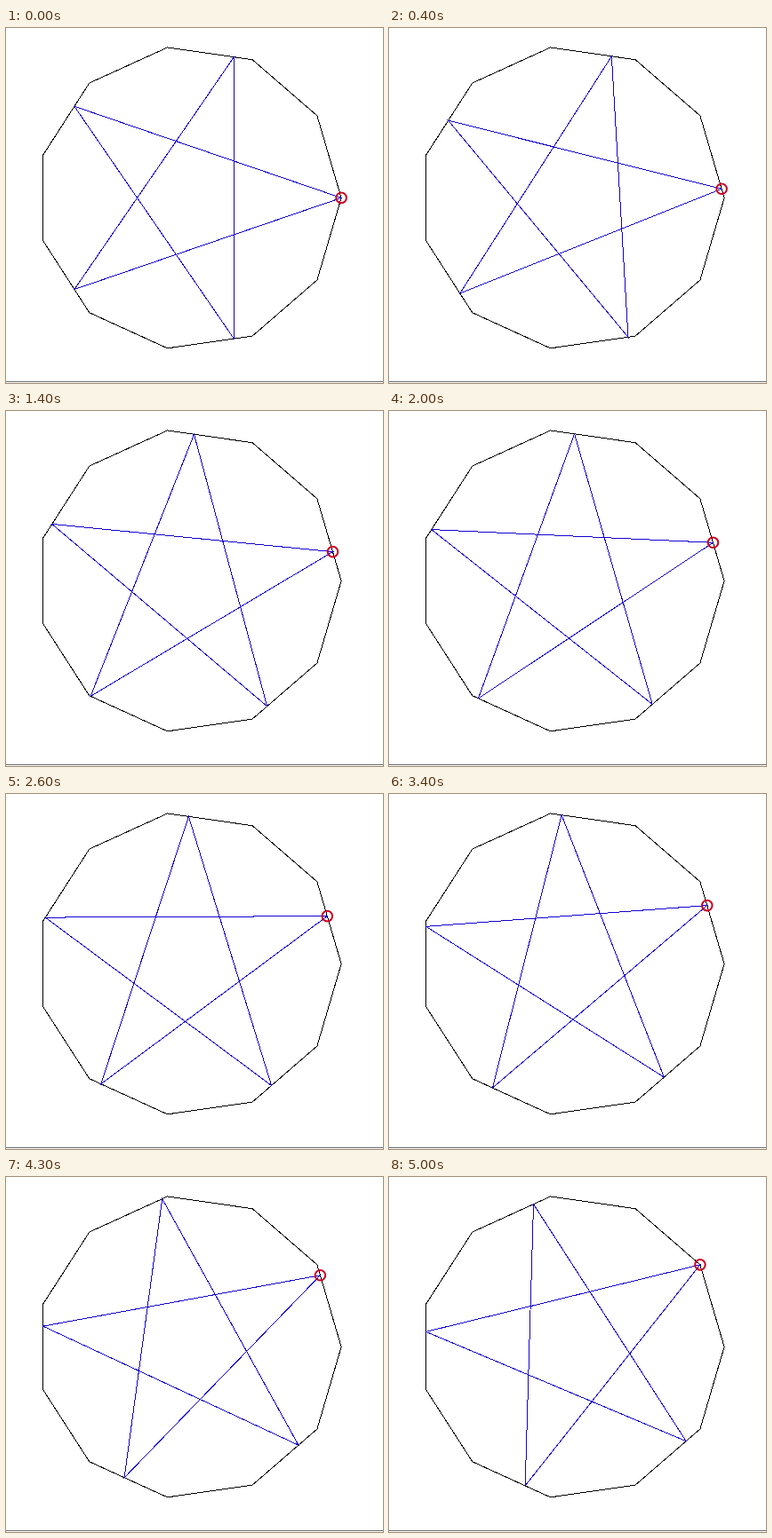
An HTML page that plays this animation: 424x400 px, repeating every 5.1 s.

```html
<!DOCTYPE html>
<html lang="en">
<head>
<meta charset="utf-8">
<title>Equilateral pentagram in a hendecagon</title>
<style>
  html, body { margin: 0; width: 100%; height: 100%; overflow: hidden; background: #fff; }
  svg { display: block; width: 424px; height: 400px; }
  .line { fill: none; stroke-width: 1; shape-rendering: crispEdges; }
</style>
</head>
<body>
<svg viewBox="0 0 424 400">
  <rect width="424" height="400" fill="#fff"/>
  <rect y="398" width="424" height="1" fill="#6c6c6c"/>
  <polygon id="ring" class="line" stroke="#000"/>
  <polygon id="star" class="line" stroke="#1400d2"/>
  <circle id="mark" r="5.8" fill="none" stroke="#cc0022" stroke-width="2"/>
</svg>
<script>
const SIDES = 11, CX = 205.9, CY = 191.4, R = 171.2;
const LOOP = 5100, STEP = 100;
const ring = document.getElementById('ring');
const star = document.getElementById('star');
const mark = document.getElementById('mark');

// Position of the leading tip along one side: [step, fraction]
const pace = [[0, 0], [4, .109], [6, .168], [14, .354], [18, .427],
              [26, .581], [34, .711], [43, .871], [50, 1]];

function corner(k) {
  const a = 2 * Math.PI * k / SIDES;
  return [CX + R * Math.cos(a), CY - R * Math.sin(a)];
}

// Point on the outline, u counted in sides
function at(u) {
  const k = Math.floor(u), f = u - k;
  const a = corner(k), b = corner(k + 1);
  return [a[0] + (b[0] - a[0]) * f, a[1] + (b[1] - a[1]) * f];
}

function bisect(lo, hi, tooLow) {
  for (let i = 0; i < 40; i++) {
    const mid = (lo + hi) / 2;
    if (tooLow(mid)) lo = mid; else hi = mid;
  }
  return (lo + hi) / 2;
}

// Next outline position at chord length len from u
function hop(u, len) {
  const p = at(u);
  return bisect(u + 3.5, u + 5.2, v => {
    const q = at(v);
    return Math.hypot(q[0] - p[0], q[1] - p[1]) < len;
  });
}

function walk(u, len) {
  const path = [u];
  for (let i = 0; i < 5; i++) path.push(hop(path[i], len));
  return path;
}

// Five equal chords that close after two turns
function pentagram(u) {
  const len = bisect(300, 330, l => walk(u, l)[5] < u + 2 * SIDES);
  return walk(u, len).slice(0, 5).map(at);
}

function progress(n) {
  let i = 1;
  while (i < pace.length - 1 && pace[i][0] < n) i++;
  const [n0, s0] = pace[i - 1], [n1, s1] = pace[i];
  return s0 + (s1 - s0) * (n - n0) / (n1 - n0);
}

const toPoints = list => list.map(p => p.map(c => c.toFixed(2)).join()).join(' ');

let shown = -1;
function draw(ms) {
  const n = Math.floor((ms % LOOP) / STEP);
  if (n === shown) return;
  shown = n;
  const tips = pentagram(progress(n));
  star.setAttribute('points', toPoints(tips));
  mark.setAttribute('cx', tips[0][0]);
  mark.setAttribute('cy', tips[0][1]);
}

ring.setAttribute('points', toPoints(Array.from({ length: SIDES }, (_, k) => corner(k))));

const start = performance.now();
function tick() {
  draw(performance.now() - start);
  requestAnimationFrame(tick);
}
tick();
</script>
</body>
</html>
```
